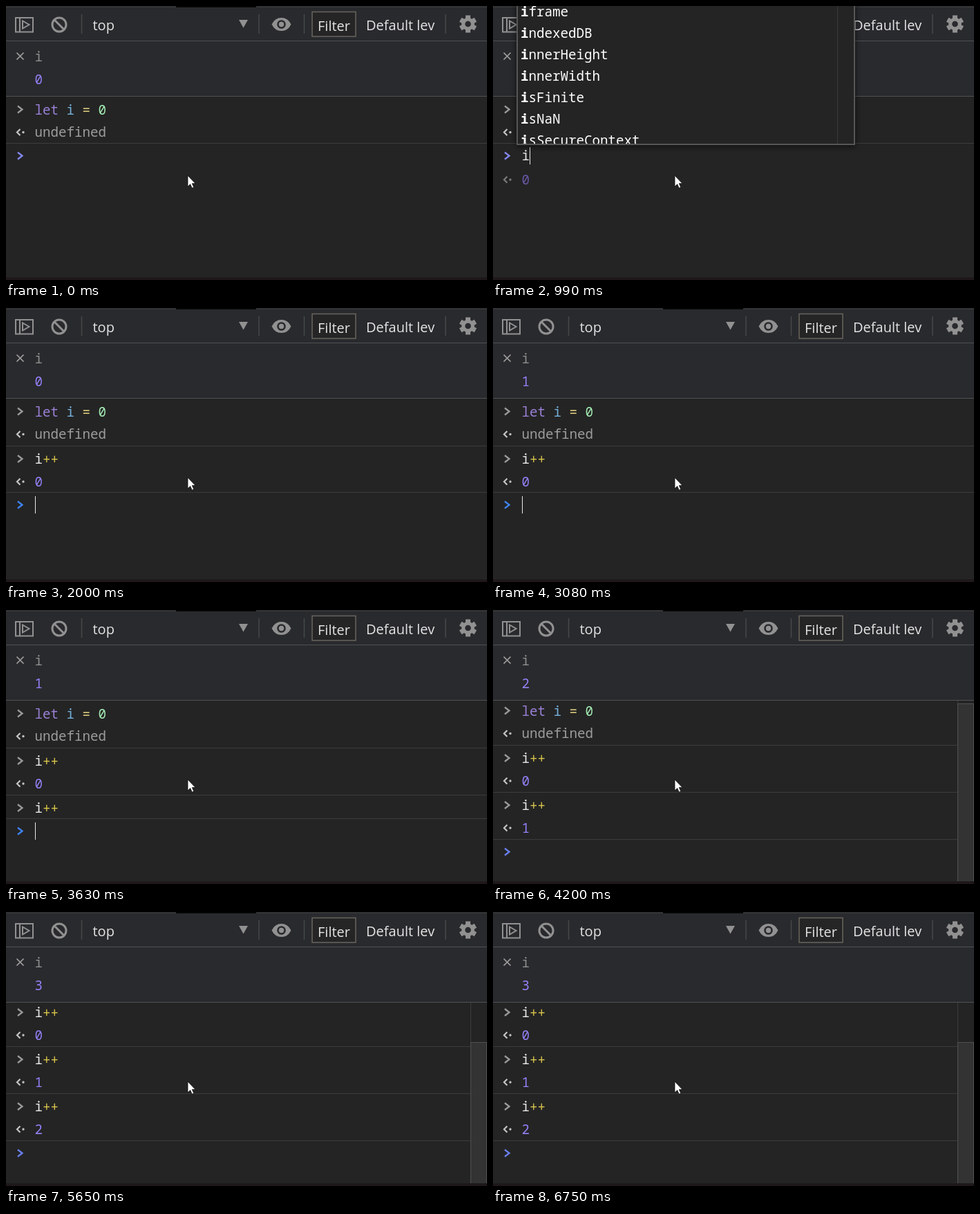
Write an HTML page that moves like this. It is 696 px wide and 396 px high and loops after 7050 ms.

```html
<!DOCTYPE html>
<html lang="en">
<head>
<meta charset="utf-8">
<title>Console: i++</title>
<style>
  html, body { margin: 0; width: 100%; height: 100%; overflow: hidden; background: #242424; }
  svg { display: block; width: 696px; height: 396px; }
  text { white-space: pre; }
  .mono { font: 19.17px "Noto Sans Mono", "DejaVu Sans Mono", monospace; }
  .ui { font: 20px "Open Sans", "Noto Sans", sans-serif; fill: #e4e4e4; }
  .icon { fill: none; stroke: #919191; stroke-width: 2; }
</style>
</head>
<body>
<svg viewBox="0 0 696 396">
  <rect width="696" height="396" fill="#242424"/>
  <g id="log" class="mono"></g>
  <rect y="392" width="696" height="4" fill="#1f181b"/>

  <rect width="696" height="131" fill="#292a2d"/>
  <path d="M0 1.5H696" stroke="#3a3b3d"/>
  <rect x="246" width="116" height="2" fill="#050505"/>
  <path d="M0 50.5H696M0 130.5H696" stroke="#505153"/>
  <path d="M109.5 12V40M366 12V40M431.5 12V40M636 12V40" stroke="#47484a" stroke-width="1.5"/>

  <g class="icon">
    <path d="M14 17H39V37.5H14ZM20 17V37.5"/>
    <path d="M24 21.5L33.5 27L24 32.5Z"/>
    <circle cx="77" cy="27" r="10" stroke-width="3"/>
    <path d="M70 20L84 34" stroke-width="3"/>
    <path d="M15.500 67.500L25.500 77.500M25.500 67.500L15.500 77.500" stroke="#a0a0a0" stroke-width="1.7"/>
  </g>
  <path d="M337 20H350L343.500 31.500Z" fill="#919191"/>
  <path d="M384.500 26.500Q389 17 398.500 17T412.500 26.500Q408 36 398.500 36T384.500 26.500Z" fill="#919191"/>
  <circle cx="398.500" cy="26.500" r="5" fill="#919191" stroke="#292a2d" stroke-width="2.600"/>
  <g transform="translate(668.500 26)" stroke="#919191" stroke-width="7">
    <path id="tooth" d="M0 -12.500V12.500"/>
    <use href="#tooth" transform="rotate(60)"/>
    <use href="#tooth" transform="rotate(120)"/>
    <circle r="6.800" fill="#292a2d" stroke-width="5"/>
  </g>
  <rect x="443" y="8.500" width="63" height="35.500" fill="#252526" stroke="#69655e" stroke-width="1.500"/>
  <g class="ui">
    <text x="125.500" y="35">top</text>
    <text x="451" y="36">Filter</text>
    <text x="521" y="35">Default lev</text>
  </g>
  <g class="mono">
    <text x="41.500" y="80" fill="#8c8c8c">i</text>
    <text id="watch" x="41.500" y="113" fill="#9580f8"></text>
  </g>

  <g id="popup" class="mono" fill="#fff">
    <rect x="35" y="-10" width="488" height="210" fill="#242424" stroke="#565656" stroke-width="2"
      style="filter: drop-shadow(0 2px 4px #0009)"/>
    <path d="M498.500 0V199" stroke="#393939"/>
    <clipPath id="list"><rect x="36" width="462" height="199"/></clipPath>
    <g id="names" clip-path="url(#list)"></g>
  </g>

  <path d="M263 245V261L266.700 257.600L269.200 263.200L271.800 262L269.300 256.600H274Z"
    fill="#fff" stroke="#111" stroke-width=".8"/>
</svg>
<script>
const $ = id => document.getElementById(id);
const LOOP = 7050, X = 41.5, ADVANCE = 11.5;

// Each step changes part of the state from its time on.
const steps = [
  [0, { caret: 0, typed: "", done: 0, pending: 0, watch: 0, scroll: 0, popup: 0, eager: 0, prompt: "#8587f2" }],
  [530, { caret: 1 }],
  [910, { typed: "i" }],
  [990, { popup: 1, eager: 1 }],
  [1290, { typed: "i+", popup: 0, eager: 0 }],
  [1520, { typed: "i++", prompt: "#3f83f2" }],
  [2000, { typed: "", done: 1 }],
  [2230, { watch: 1 }],
  [2530, { caret: 0 }],
  [3080, { caret: 1 }],
  [3160, { typed: "i++" }],
  [3630, { typed: "", pending: 1 }],
  [3700, { done: 2, pending: 0, scroll: 4, prompt: "#6a80ee" }],
  [3860, { watch: 2 }],
  [4200, { caret: 0 }],
  [4730, { caret: 1, typed: "i++" }],
  [5100, { typed: "", pending: 1, scroll: 38 }],
  [5180, { done: 3, pending: 0, scroll: 73 }],
  [5410, { watch: 3 }],
  [5650, { caret: 0 }],
  [6200, { caret: 1 }],
  [6750, { caret: 0 }]
];

const span = (s, fill) => `<tspan fill="${fill}">${s}</tspan>`;
const text = (y, s, fill = "#e6e6e6") => `<text x="${X}" y="${y + 7}" fill="${fill}">${s}</text>`;
const code = s => span(s[0] || "", "#e6e6e6") + span(s.slice(1), "#dac64c");
const chevron = (y, color = "#9a9a9a") =>
  `<path d="M17 ${y - 5}L23.500 ${y}L17 ${y + 5}" fill="none" stroke="${color}" stroke-width="2.300"/>`;
const reply = (y, color = "#c4c4c4") =>
  `<path d="M20.500 ${y - 4.5}L16 ${y}L20.500 ${y + 4.5}" fill="none" stroke="${color}" stroke-width="2.200"/>
   <circle cx="25" cy="${y}" r="1.700" fill="${color}"/>`;

function drawLog(s) {
  const width = s.scroll ? 672 : 696;
  const rule = y => `<rect y="${y}" width="${width}" height="1" fill="#3c3c3c"/>`;
  let out = chevron(149.5) + reply(182.5) + text(182, "undefined", "#9c9c9c") +
    text(150, span("let ", "#9a80d6") + span("i ", "#74afd8") + span("= ", "#dccb7c") + span("0", "#a6efb6"));

  for (let k = 0; k < s.done + s.pending; k++) {
    const y = 199 + 68 * k;
    out += rule(y) + chevron(y + 19) + text(y + 19, code("i++"));
    if (k < s.done) out += reply(y + 52) + text(y + 52, k, "#9580f8");
  }

  const end = Math.round(198 + 68.33 * s.done + 34.3 * s.pending), y = end + 18;
  out += rule(end) + chevron(y + .5, s.prompt) + text(y, code(s.typed));
  if (s.eager) out += reply(y + 35, "#7c7c7c") + text(y + 35, 0, "#6857a4");
  if (s.caret) {
    const x = Math.floor(X + .5 + ADVANCE * s.typed.length);
    out += `<rect x="${x}" y="${y - 12}" width="1" height="25" fill="#e8e8e8"/>`;
  }
  out = `<g transform="translate(0 ${-s.scroll})">${out}</g>`;

  if (s.scroll) {
    const top = Math.round(131 + s.scroll * 265 / (265 + s.scroll));
    out += `<rect x="672.500" y="130.500" width="24" height="270" fill="#242424" stroke="#3b3b3b"/>
      <rect x="672.500" y="${top + .5}" width="23" height="${395 - top}" fill="#333" stroke="#505050"/>`;
  }
  return out;
}

$("names").innerHTML = ["iframe", "indexedDB", "innerHeight", "innerWidth", "isFinite", "isNaN", "isSecureContext"]
  .map((name, k) => `<text x="40" y="${15 + 31 * k}" font-weight="500"><tspan font-weight="700">i</tspan>${name.slice(1)}</text>`)
  .join("");

let shown = 0;
function tick() {
  const t = performance.now() % LOOP;
  const past = steps.filter(([at]) => at <= t);
  if (past.length !== shown) {
    shown = past.length;
    const s = Object.assign({}, ...past.map(p => p[1]));
    $("log").innerHTML = drawLog(s);
    $("watch").textContent = s.watch;
    $("popup").style.display = s.popup ? "" : "none";
  }
  requestAnimationFrame(tick);
}
tick();
</script>
</body>
</html>
```
